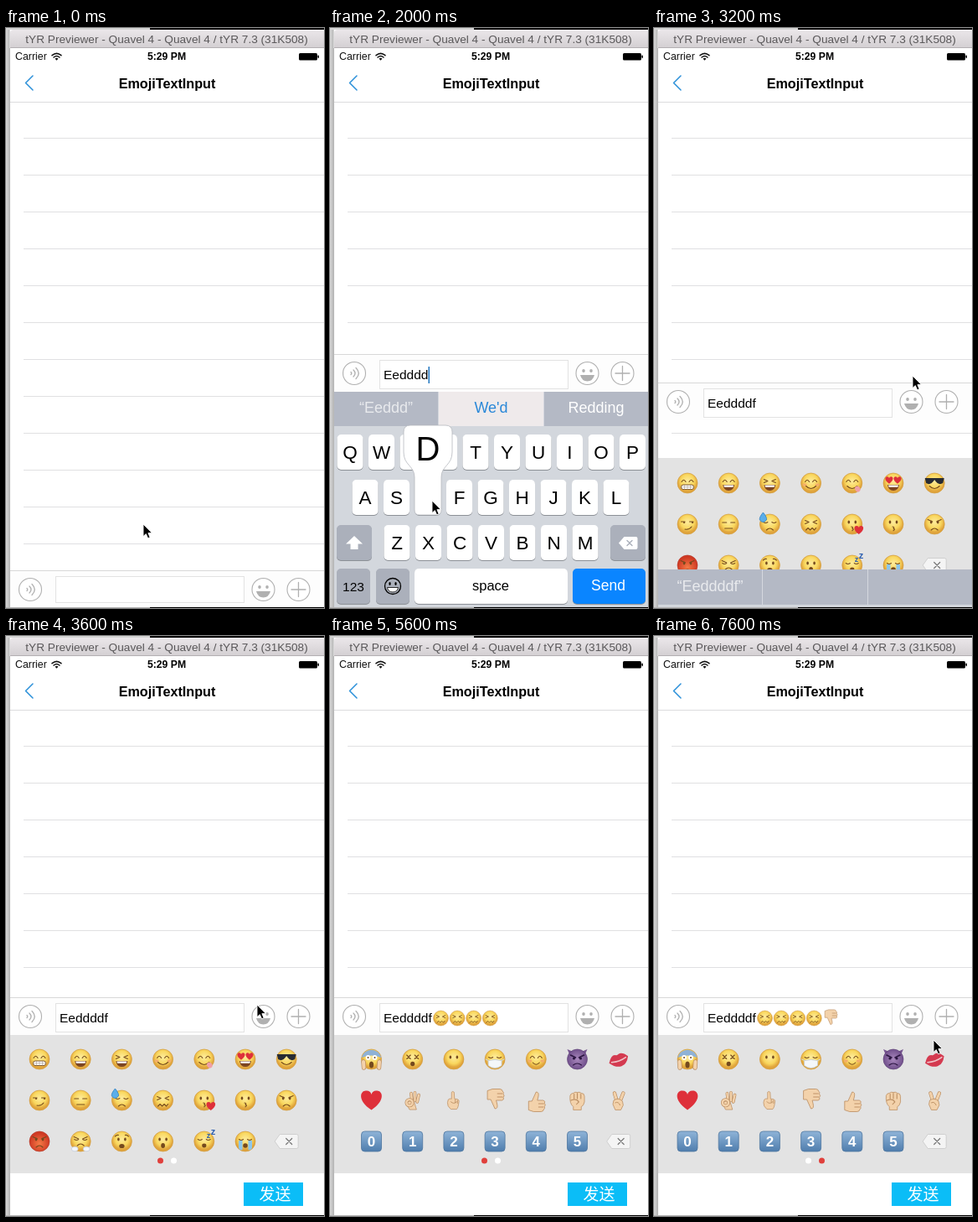
These frames come from a looping animation (380 px wide and 692 px high, 8000 ms). An HTML page:

```html
<!DOCTYPE html>
<html lang="en">
<head>
<meta charset="utf-8">
<title>EmojiTextInput</title>
<style>
html, body { margin: 0; width: 100%; height: 100%; overflow: hidden; background: #fff; }
svg { display: block; width: 380px; height: 692px; }
text { font-family: "Liberation Sans", Arial, sans-serif; white-space: pre; }
.cjk { font-family: "Noto Sans CJK SC", "Noto Sans CJK", sans-serif; font-weight: 300; }
.mid { text-anchor: middle; }
</style>
</head>
<body>
<svg id="stage" viewBox="0 0 380 692">
  <defs>
    <linearGradient id="bar" x2="0" y2="1"><stop stop-color="#ebe7ea"/><stop offset="1" stop-color="#d3cfd2"/></linearGradient>
    <linearGradient id="side"><stop stop-color="#d9d9d9"/><stop offset="1" stop-color="#b4b4b4"/></linearGradient>
    <linearGradient id="cap" x2="0" y2="1"><stop stop-color="#8fb4d8"/><stop offset="1" stop-color="#4f7dad"/></linearGradient>
    <radialGradient id="yellow" cy=".4"><stop stop-color="#fdeb9c"/><stop offset=".65" stop-color="#f9d75e"/><stop offset="1" stop-color="#e0a43c"/></radialGradient>
    <radialGradient id="red" cy=".6"><stop stop-color="#f47a45"/><stop offset="1" stop-color="#cf3a24"/></radialGradient>
    <radialGradient id="purple"><stop stop-color="#a988bd"/><stop offset="1" stop-color="#71508c"/></radialGradient>
  </defs>
  <rect width="380" height="692" fill="#fff"/>
  <g id="list"></g>
  <g id="panel"></g>
  <g id="keys"></g>
  <g id="tool"></g>
  <g id="pop"></g>
  <g id="chrome"></g>
  <path id="mouse" d="M0 0v14.6l3.3-3 2.3 5.2 2.5-1.1-2.2-5.1h4.6z" fill="#000" stroke="#fff" stroke-width=".9"/>
</svg>
<script>
const $ = id => document.getElementById(id);
const ink = '#754a1e';
const rect = (x, y, w, h, fill, r = 0, more = '') =>
  `<rect x="${x}" y="${y}" width="${w}" height="${h}" rx="${r}" fill="${fill}" ${more}/>`;
const text = (x, y, size, s, fill = '#000', more = 'class="mid"') =>
  `<text x="${x}" y="${y}" font-size="${size}" fill="${fill}" ${more}>${s}</text>`;
const line = (d, c = ink, w = 1.1) =>
  `<path d="${d}" fill="none" stroke="${c}" stroke-width="${w}" stroke-linecap="round" stroke-linejoin="round"/>`;
const fill = (d, c, edge = 'none') => `<path d="${d}" fill="${c}" stroke="${edge}" stroke-width=".8"/>`;
const oval = (x, y, rx, ry, c = ink, more = '') =>
  `<ellipse cx="${x}" cy="${y}" rx="${rx}" ry="${ry}" fill="${c}" ${more}/>`;
const at = (x, y, s, k = 1) => `<g transform="translate(${x} ${y}) scale(${k})">${s}</g>`;
const range = n => [...Array(n).keys()];

// Emoji parts, centred on 0,0 with a radius of 12
const skin = '#f3d2ab', skinEdge = '#b98c60', white = '#fff';
const ball = (c = 'yellow', edge = '#cf9738') => oval(0, 0, 12, 12, `url(#${c})`, `stroke="${edge}" stroke-width=".6"`);
const face = s => ball() + s;
const dots = oval(-4, -2.5, 1.3, 1.9) + oval(4, -2.5, 1.3, 1.9);
const happy = line('M-7-1.5q2.5-4.5 5 0M2-1.5q2.5-4.5 5 0');
const shut = line('M-7.5-2.5q2.5 2 5 0M2.5-2.5q2.5 2 5 0');
const flat = line('M-7.5-2h5M2.5-2h5');
const squint = line('M-7-4.5l4.5 2-4.5 2M7-4.5l-4.5 2 4.5 2');
const smile = line('M-6 3.5q6 6 12 0');
const frown = line('M-4 7q4-4 8 0');
const brows = line('M-8-5.5l5.5 2.5M8-5.5l-5.5 2.5');
const blush = oval(-7.5, 2, 2.6, 1.8, '#f3ae6a') + oval(7.5, 2, 2.6, 1.8, '#f3ae6a');
const laugh = fill('M-7 2h14q-1 7-7 7t-7-7z', '#7c4522') + fill('M-6 2.4h12l-.7 2.4h-10.6z', white);
const kiss = line('M-1 3q3 .5 1 2.2q3 .5 0 2.5');
const heart = (x, y, k) => at(x, y, fill('M0 10C-16-1-11-11-5-10Q-1-10 0-6Q1-10 5-10C11-11 16-1 0 10z', '#de303a'), k);
const hand = (d, w) => line(d, skinEdge, w + 1.4) + line(d, skin, w);
const thumb = fill('M-9 1h4l5-11q4 0 2.5 6l-1 4h7q3 1 1.5 3.5q2 2 0 4q1 2-1 3.5q0 2-3 2.5h-9l-6-2z', skin, skinEdge)
  + line('M3 4h6M3 8h5.6', skinEdge, .9);
const drop = fill('M0-6q5 6 4 9-4 5-8 0-1-3 4-9z', '#5aaeea', '#2f7fc0');
const puff = x => oval(x, 9, 4, 2.8, '#f3f6fb', 'stroke="#b9c3d3" stroke-width=".6"');
const back = fill('M-14 0l6-8.5h20q2 0 2 2v13q0 2-2 2h-20z', '#f4f4f4', '#c8c8c8') + line('M-.5-3.5l7 7M6.5-3.5l-7 7', '#777', 1.2);
const digit = n => rect(-12, -12, 24, 24, 'url(#cap)', 4, 'stroke="#4f76a0" stroke-width=".8"')
  + text(0, 6, 17, n, white, 'class="mid" font-weight="bold"');
const snore = (x, y, size) => text(x, y, size, 'z', '#2d5fb0', 'font-weight="bold"');

const ugh = face(squint + line('M-6 7l2.5-2.5 2.5 2.5 2.5-2.5 2.5 2.5 2-2.5'));
const down = `<g transform="scale(1 -1)">${thumb}</g>`;

const pages = [[
  face(happy + rect(-7.5, 2, 15, 5.5, white, 2.5, `stroke="${ink}" stroke-width=".9"`) + line('M-7 4.7h14M-3.5 2v5.5M0 2v5.5M3.5 2v5.5', '#9d8d7c', .5)),
  face(happy + laugh),
  face(squint + laugh),
  face(blush + happy + smile),
  face(happy + smile + oval(6.5, 7, 3, 3.6, '#f0a0a8', 'transform="rotate(-35 6.5 7)"')),
  face(heart(-5, -3.5, .42) + heart(5, -3.5, .42) + laugh),
  face(fill('M-11.5-6h23l-1.5 6q-5 3-8.5-2l-1.5-2-1.5 2q-3.5 5-8.5 2z', '#272b33') + smile),
  face(line('M-7.5-3h4.5M2.5-3h4.5') + oval(-4, -2, 1.2, 1) + oval(6, -2, 1.2, 1) + line('M-3 6q5 1 8-3')),
  face(flat + line('M-4.5 5h9')),
  face(shut + frown + at(-8, -8, drop)),
  ugh,
  face(dots + kiss + heart(8, 7, .5)),
  face(dots + kiss),
  face(brows + dots + frown),
  ball('red', '#b03022') + brows + dots + frown,
  face(brows + shut + line('M-4 5q4-4 8 0') + puff(-7) + puff(7)),
  face(line('M-8-6q2-2 4-1.5M8-6q-2-2-4-1.5') + dots + oval(0, 5.5, 3.2, 2.6)),
  face(dots + oval(0, 5, 2.4, 3)),
  face(shut + oval(0, 5, 2.6, 2.4) + snore(3, -4, 9) + snore(8, -8, 11)),
  face(fill('M-8-1h4.5v11q-3 1-4.5-2zM8-1h-4.5v11q3 1 4.5-2z', '#8cc6ec') + shut + oval(0, 5, 2.8, 2.8)),
  back
], [
  face(fill('M-11.7-2a12 12 0 0 1 23.4 0q-12-5-23.4 0z', '#8fb2d6') + oval(-4, -2, 2.8, 3, white) + oval(4, -2, 2.8, 3, white)
    + oval(-4, -2, 1, 1) + oval(4, -2, 1, 1) + oval(0, 6.5, 2.6, 4) + hand('M-9 10l-.5-7M9 10l.5-7', 4)),
  face(line('M-7-5l4.5 4.5M-2.5-5l-4.5 4.5M7-5l-4.5 4.5M2.5-5l4.5 4.5') + oval(0, 5.5, 2.6, 2.8)),
  face(dots),
  face(shut + line('M-11 0l4 2M11 0l-4 2', '#cfd8e0', 1) + fill('M-8 1.5q8-2 16 0v6q-8 6-16 0z', '#f4f7fa', '#c3ccd4')),
  face(blush + happy + line('M-4 4q4 4.5 8 0')),
  fill('M-9-5l-3-7 7 3M9-5l3-7-7 3', '#775690') + ball('purple', '#5c3f74') + line('M-8-5l6 3M8-5l-6 3', '#2b1540', 1.6)
    + oval(-4, -1, 1.6, 1.6, '#2b1540') + oval(4, -1, 1.6, 1.6, '#2b1540') + line('M-5 7q5-4 10 0', '#2b1540'),
  `<g transform="rotate(-18)">${fill('M-12 1q5-9 10-7 2 1.5 4 0 5-1 10 6-4 9-11 9t-13-8z', '#d43a50')}${line('M-9 1q9 2.5 18-.5', '#f0c4c9', 1.6)}</g>`,
  heart(0, 0, 1.15),
  at(0, 0, fill('M-4 12l-4-8q4-5 10-2l3 10z', skin, skinEdge) + hand('M-1-1L-2-9M3 0L3-10M6 2L8-7', 2.6)
    + oval(-4, 3, 4, 4, 'none', `stroke="${skinEdge}" stroke-width="4"`) + oval(-4, 3, 4, 4, 'none', `stroke="${skin}" stroke-width="2.6"`), .92),
  at(0, 0, fill('M-3-11q1.5-2 3.500 0l.5 9q7 0 6 4l-1 6q-1 3-2 4h-8q-5-4-4.500-9l1-4q2-2 4.500-1z', skin, skinEdge)
    + line('M-4 2q4 4 8 0M2-1v4M5 0v4', skinEdge, .9), .88),
  down,
  thumb,
  at(0, 0, fill('M-9-6q1-3 4-3 2-2 5-1 3-1 5 1 4 0 4 4v7q-1 5-4 6v4h-10v-4q-5-4-4-14z', skin, skinEdge)
    + line('M-4-8v6M0-9v7M4.5-8v6M-8 0q7-3 10 2l-3 3', skinEdge), .95),
  at(0, 0, hand('M-2 1L-5-9M2 1L6-9', 3.2) + fill('M-6 0q6-4 11 1l1 5-3 6h-7l-3-7z', skin, skinEdge) + line('M-4 3q4-2 6 3', skinEdge, .9), .95),
  ...range(6).map(digit),
  back
]];

// Fixed parts
$('list').innerHTML = range(12).map(i => rect(21, 131 + 44 * i, 359, 1, '#e0e0e2')).join('');

$('chrome').innerHTML =
  rect(0, 0, 4.5, 692, 'url(#side)') + rect(4, 24, 1, 668, '#b8b8b8')
  + rect(0, 0, 172, 2, '#d4d4d4') + rect(172, 0, 208, 2, '#000') + rect(172, 691, 208, 1, '#000')
  + rect(0, 691, 172, 1, '#b5b5b5')
  + fill('M5 24V6q0-4 4-4h367q4 0 4 4v18z', 'url(#bar)') + rect(5, 23, 375, 1, '#b4b0b3')
  + text(192, 17.5, 13.65, 'tYR Previewer - Quavel 4 - Quavel 4 / tYR 7.3 (31K508)', '#5a585a')
  + text(11, 38, 12.4, 'Carrier', '#111', '')
  + line('M55 32.7q5.5-4.6 11 0M57 35q3.5-3 7 0', '#111', 1.5) + fill('M58.5 36.5q2-1.5 4 0l-2 2.3z', '#111')
  + text(192, 38, 12.2, '5:29 PM', '#000', 'class="mid" font-weight="bold"')
  + rect(350, 30, 22, 8.5, '#000', 1.5) + rect(372.5, 32.5, 1.5, 3.5, '#000', .7)
  + text(192.5, 72, 16.2, 'EmojiTextInput', '#000', 'class="mid" font-weight="bold"')
  + line('M32 57l-8.5 8.5 8.5 8.5', '#2b90d9', 1.5) + rect(5, 88, 375, 1, '#dcdcde');

const grey = '#b0b0b0';
const ring = x => oval(x, 23, 13.5, 13.5, '#fff', `stroke="${grey}" stroke-width="1.1"`);
$('tool').innerHTML = rect(5, 0, 375, 45, '#fdfdfd') + rect(5, 0, 375, 1, '#d8d8d8')
  + ring(29) + line('M25 21.5q1.5 1.5 0 3M28 19q4 4 0 8M31 16.5q6.5 6.5 0 13', grey, 1.3)
  + rect(59.5, 7.5, 225, 31, '#fff', 0, 'id="field" stroke="#e2e2e2"')
  + ring(307.5) + oval(303, 20, 1.8, 2, grey) + oval(312, 20, 1.8, 2, grey) + fill('M299 25h17q-2 7.5-8.5 7.5t-8.5-7.5z', grey)
  + ring(349.5) + line('M341 23h17M349.5 14.5v17', grey, 1.3)
  + text(64, 30, 15.5, '', '#000', 'id="typed"') + '<g id="added"></g>'
  + rect(0, 14, 1.6, 20, '#2a7cc4', 0, 'id="caret"');

// Keyboard
const key = (x, y, w, c = '#fff') => rect(x, y + 1, w, 42, '#8c9096', 5) + rect(x, y, w, 42, c, 5);
const letters = (s, x0, y) => [...s].map((c, i) => {
  const x = x0 + 37.5 * i;
  return key(x - 15.5, y, 31) + text(x, y + 29, 22.5, c);
}).join('');
const dark = '#abb0bb';
$('keys').innerHTML = rect(5, 433, 375, 260, '#d3d7dd') + rect(5, 433, 375, 42, '#b4b9c5')
  + rect(130, 433, 125, 42, '#efeaeb', 0, 'id="pick"')
  + rect(129, 433, 1, 42, '#d5d8df') + rect(255, 433, 1, 42, '#d5d8df')
  + [67, 192.5, 318].map((x, i) => text(x, 459, 18, '', white, `class="mid" id="hint${i}"`)).join('')
  + letters('QWERTYUIOP', 24, 485) + letters('ASDFGHJKL', 42, 539) + letters('ZXCVBNM', 80, 593)
  + '<g id="shift"></g><path id="arrow" d="M29 606l10 9.5h-5.5v6.5h-9v-6.5h-5.5z"/>'
  + key(335, 593, 42, dark) + fill('M345 614.5l6.5-7.5h14q2 0 2 2v11q0 2-2 2h-14z', white) + line('M355 611.5l6 6M361 611.5l-6 6', dark, 1.4)
  + key(8, 645, 40, dark) + text(28, 672, 15.5, '123')
  + key(55, 645, 40, dark) + oval(75, 666, 9.5, 9.5, 'none', 'stroke="#000" stroke-width="1.3"')
  + oval(71.5, 663, 1.2, 1.9, '#000') + oval(78.5, 663, 1.2, 1.9, '#000') + fill('M68.5 667.5h13q-1 5.5-6.5 5.5t-6.5-5.5z', '#fff', '#000')
  + key(101, 645, 183) + text(192, 671, 16.5, 'space')
  + key(290, 645, 87, '#0a85ff') + text(332.5, 671, 17.5, 'Send', white);

// Emoji panel
const grid = icons => icons.map((s, i) => at(40 + 49.2 * (i % 7), 30 + 49 * Math.floor(i / 7), s)).join('');
$('panel').innerHTML = rect(5, 0, 375, 166, '#e3e3e3') + rect(5, 166, 375, 60, '#fff')
  + `<g id="pages"><g>${grid(pages[0])}</g><g transform="translate(375 0)">${grid(pages[1])}</g></g>`
  + oval(184.5, 151, 3.5, 3.5, '', 'id="dot0"') + oval(200.5, 151, 3.5, 3.5, '', 'id="dot1"')
  + rect(284, 177, 71, 28, '#0bbdf7')
  + text(321.5, 198, 19, '发送', white, 'class="mid cjk"');

function popup(c, x) {
  return fill(`M${x - 29} 482q0-8 8-8h42q8 0 8 8v24c0 16-13 16-13 30v39q0 6-6 6h-20q-6 0-6-6v-39c0-14-13-14-13-30z`, '#fff', '#b5b8be')
    + text(x, 516, 40, c);
}

// Each step lasts 400 ms and keeps whatever it does not change
const changes = [
  { bar: 647, kb: 999, panel: 999, s: '', caret: 0, add: '', pop: '', hints: [], lit: 0, caps: 1, scroll: 0, dot: 0, mouse: [164, 592] },
  { caret: 1, mouse: [152, 662] },
  { bar: 389, kb: 433, hints: ['I', 'The', "We're"], mouse: [114, 538] },
  { s: 'Ee', caps: 0, hints: ['“Ee”', 'Eek', 'Eerie'], mouse: [97, 507] },
  { s: 'Eed', hints: ['“Eed”', "We'd", 'Reed'], mouse: [121, 563] },
  { s: 'Eedddd', pop: 'D', lit: 1, hints: ['“Eeddd”', "We'd", 'Redding'], mouse: [122, 564] },
  { s: 'Eeddddf', pop: 'F', lit: 0, hints: ['“Eeddddf”'], mouse: [156, 562] },
  { pop: '', mouse: [297, 430] },
  { bar: 423, kb: 646, panel: 513, caret: 0, mouse: [309, 415] },
  { bar: 431, kb: 999, panel: 475, mouse: [300, 440] },
  { mouse: [192, 545] },
  { add: 'uuuu', mouse: [198, 506] },
  { mouse: [285, 547] },
  { mouse: [225, 530] },
  { scroll: 365.5, mouse: [-40, 0] },
  { scroll: 375, dot: 1 },
  { add: 'uuuuddd', mouse: [190, 548] },
  { add: 'uuuudd', mouse: [330, 603] },
  { add: 'uuuud' },
  { mouse: [334, 482] }
];
const steps = [];
changes.forEach((c, i) => steps.push({ ...steps[i - 1], ...c }));

const set = (id, o) => { for (const k in o) $(id).setAttribute(k, o[k]); };
const move = (id, x, y) => set(id, { transform: `translate(${x} ${y})` });

function show(p) {
  move('tool', 0, p.bar);
  move('keys', 0, p.kb - 433);
  move('panel', 0, p.panel);
  move('pages', -p.scroll, 0);
  move('mouse', ...p.mouse);
  set('field', { height: p.s ? 34 : 31 });
  $('typed').textContent = p.s;
  $('added').innerHTML = [...p.add].map((c, i) => at(132.5 + 19.6 * i, 25, c === 'u' ? ugh : down, .75)).join('');
  const end = p.s ? 64 + $('typed').getComputedTextLength() : 63;
  set('caret', { x: end, y: p.s ? 15 : 14, opacity: p.caret });
  set('pick', { opacity: p.lit });
  range(3).forEach(i => {
    $('hint' + i).textContent = p.hints[i] || '';
    set('hint' + i, { fill: p.lit && i === 1 ? '#2a88d8' : white, opacity: i === 0 && p.s ? .7 : 1 });
    if (i < 2) set('dot' + i, { fill: p.dot === i ? '#e0403c' : white });
  });
  $('shift').innerHTML = key(8, 593, 42, p.caps ? '#fff' : dark);
  set('arrow', { fill: p.caps ? '#000' : white });
  $('pop').innerHTML = p.pop ? popup(p.pop, 42 + 37.5 * 'ASDF'.indexOf(p.pop)) : '';
}

let last = -1;
const begin = performance.now();
function tick() {
  const i = Math.floor((performance.now() - begin) % 8000 / 400);
  if (i !== last) show(steps[last = i]);
  requestAnimationFrame(tick);
}
tick();
</script>
</body>
</html>
```
